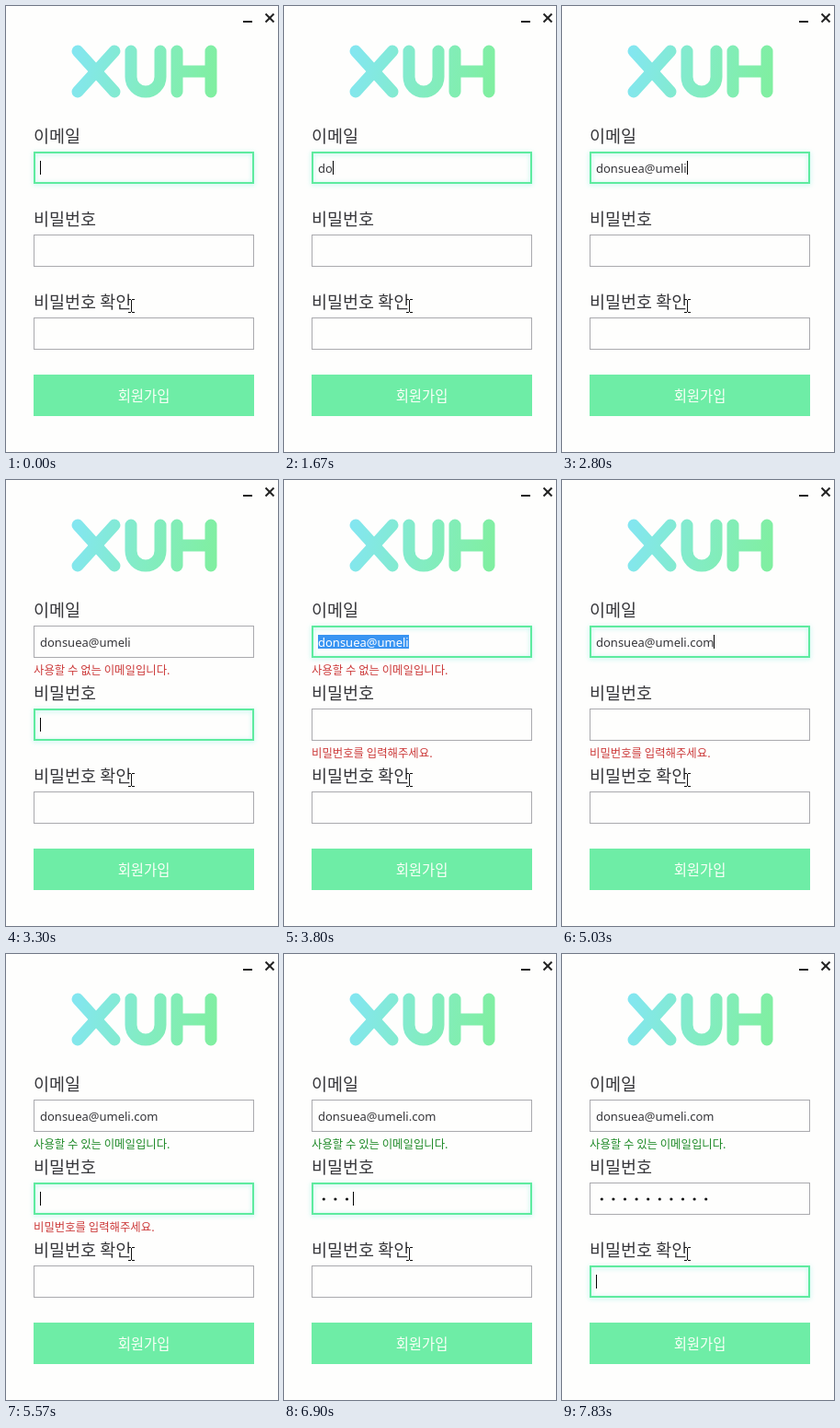
An HTML page with a canvas for the animation above (8 s loop, 296 by 484 pixels).

```html
<!DOCTYPE html>
<html lang="ko">
<head>
<meta charset="utf-8">
<title>회원가입</title>
<style>
html, body { margin: 0; width: 296px; height: 484px; overflow: hidden; background: #fefefd; }
canvas { display: block; }
</style>
</head>
<body>
<canvas id="stage" width="296" height="484"></canvas>
<script>
const ctx = document.getElementById('stage').getContext('2d');
const LOOP = 8000, BLINK = 530;
const EMAIL = 'donsuea@umeli.com';
const KOREAN = '"Noto Sans CJK KR", "Noto Sans CJK", "Noto Sans", sans-serif';
const LATIN = '"Noto Sans", sans-serif';
const PAPER = '#fefefd', INK = '#36363a', GREEN = '#5eeb9f', BUTTON = '#6eeda6';
const GOOD = '#1f8a28', BAD = '#cc3a3a';

// Evenly spaced key presses, started in bursts.
const emailKeys = [
  { at: 1530, count: 7, gap: 83 },
  { at: 2270, count: 1 },
  { at: 2470, count: 6, gap: 52 },
  { at: 2800, count: 1, erase: true },
  { at: 4600, count: 1 },
  { at: 4800, count: 3, gap: 115 }
];
const passwordKeys = [
  { at: 6670, count: 2, gap: 60 },
  { at: 6900, count: 1 },
  { at: 7130, count: 5, gap: 85 },
  { at: 7670, count: 2, gap: 60 }
];
const focusMoves = [
  { at: -160, field: 0 },
  { at: 3270, field: 1 },
  { at: 3800, field: 0 },
  { at: 5570, field: 1 },
  { at: 7830, field: 2 }
];
const DESELECT = 4100, NOTE_CLEARED = 6700;

const between = (time, from, to) => time >= from && time < to;

function pressed({ at, count, gap = 80 }, time) {
  return Math.max(0, Math.min(count, Math.floor((time - at) / gap) + 1));
}

function typedLength(bursts, time) {
  return bursts.reduce((sum, burst) => sum + pressed(burst, time) * (burst.erase ? -1 : 1), 0);
}

// The caret starts a fresh blink after every key press or focus move.
function caretVisible(time, focusedAt) {
  const active = [...emailKeys, ...passwordKeys]
    .filter(burst => burst.at <= time)
    .map(burst => burst.at + (pressed(burst, time) - 1) * (burst.gap || 0));
  const latest = Math.max(focusedAt, time >= DESELECT ? DESELECT : focusedAt, ...active);
  return Math.floor((time - latest) / BLINK) % 2 === 0;
}

function text(string, x, y, size, color, family = KOREAN, weight = 300) {
  ctx.font = `${weight} ${size}px ${family}`;
  ctx.fillStyle = color;
  ctx.fillText(string, x, y);
}

function line(x1, y1, x2, y2) {
  ctx.beginPath();
  ctx.moveTo(x1, y1);
  ctx.lineTo(x2, y2);
  ctx.stroke();
}

function cross(x, y, w, h) {
  line(x, y, x + w, y + h);
  line(x + w, y, x, y + h);
}

function drawTitle() {
  const top = 49, bottom = 93;
  const fade = ctx.createLinearGradient(71, 50, 230, 80);
  fade.addColorStop(0, '#83e6f2');
  fade.addColorStop(0.5, '#83ecc4');
  fade.addColorStop(1, '#80efa0');
  ctx.save();
  ctx.strokeStyle = fade;
  ctx.lineWidth = 13;
  ctx.lineCap = ctx.lineJoin = 'round';
  cross(78, top, 40, bottom - top);
  ctx.beginPath();
  ctx.moveTo(136, top);
  ctx.arc(152, bottom - 16, 16, Math.PI, 0, true);
  ctx.lineTo(168, top);
  ctx.moveTo(186, top);
  ctx.lineTo(186, bottom);
  ctx.moveTo(223, top);
  ctx.lineTo(223, bottom);
  ctx.moveTo(186, 71);
  ctx.lineTo(223, 71);
  ctx.stroke();
  ctx.restore();
}

function drawField(y, focused) {
  const width = focused ? 2 : 1;
  ctx.save();
  ctx.strokeStyle = focused ? GREEN : '#aaaaae';
  ctx.lineWidth = width;
  if (focused) {
    ctx.shadowColor = 'rgba(110, 236, 220, 0.6)';
    ctx.shadowBlur = 5;
    ctx.shadowOffsetY = 1;
  }
  ctx.strokeRect(30 + width / 2, y + width / 2, 240 - width, 35 - width);
  ctx.restore();
}

function drawEmail(value, selected) {
  ctx.font = `400 13px ${LATIN}`;
  const width = Math.round(ctx.measureText(value).width);
  if (selected) {
    ctx.fillStyle = '#3994f2';
    ctx.fillRect(37, 168, width, 15);
  }
  text(value, 37, 181, 13, selected ? '#fff' : INK, LATIN, 400);
  return 37 + width;
}

function drawDots(count) {
  const pitch = 12.6;
  ctx.fillStyle = '#111';
  for (let i = 0; i < count; i++) {
    ctx.beginPath();
    ctx.arc(43.3 + i * pitch, 266, 1.6, 0, Math.PI * 2);
    ctx.fill();
  }
  return 37 + Math.round(count * pitch);
}

function drawPointer() {
  ctx.strokeStyle = PAPER;
  ctx.lineWidth = 3;
  line(136.5, 318, 136.5, 333);
  ctx.strokeStyle = '#111';
  ctx.lineWidth = 1;
  line(136.5, 319, 136.5, 332);
  for (const y of [318.5, 332.5]) {
    line(133, y, 136, y);
    line(137, y, 140, y);
  }
}

function drawWindowButtons() {
  ctx.strokeStyle = '#222';
  ctx.lineWidth = 2;
  line(258, 17, 268, 17);
  cross(282.5, 8.5, 9, 9);
}

function draw(time) {
  const { at: focusedAt, field: focus } = focusMoves.filter(move => move.at <= time).pop();
  const selected = between(time, 3800, DESELECT);
  const fieldY = i => 158 + 90 * i;

  ctx.fillStyle = PAPER;
  ctx.fillRect(0, 0, 296, 484);
  drawWindowButtons();
  drawTitle();

  ['이메일', '비밀번호', '비밀번호 확인'].forEach((label, i) => {
    text(label, 30, fieldY(i) - 10, 18.5, INK);
    drawField(fieldY(i), focus === i);
  });

  const email = EMAIL.slice(0, typedLength(emailKeys, time));
  const carets = [drawEmail(email, selected), drawDots(typedLength(passwordKeys, time)), 37];
  if (!selected && caretVisible(time, focusedAt)) {
    ctx.fillStyle = '#000';
    ctx.fillRect(carets[focus], fieldY(focus) + 10, 1, 15);
  }

  if (between(time, 3270, 4600)) text('사용할 수 없는 이메일입니다.', 30, 211, 12.4, BAD);
  if (time >= 5570) text('사용할 수 있는 이메일입니다.', 30, 211, 12.4, GOOD);
  if (between(time, 3800, NOTE_CLEARED)) text('비밀번호를 입력해주세요.', 30, 301, 12.4, BAD);

  ctx.fillStyle = BUTTON;
  ctx.fillRect(30, 400, 240, 45);
  ctx.textAlign = 'center';
  text('회원가입', 150, 428.5, 15.4, '#fbfff8', KOREAN, 500);
  ctx.textAlign = 'left';

  drawPointer();
}

function tick() {
  draw(performance.now() % LOOP);
  requestAnimationFrame(tick);
}
tick();
</script>
</body>
</html>
```
